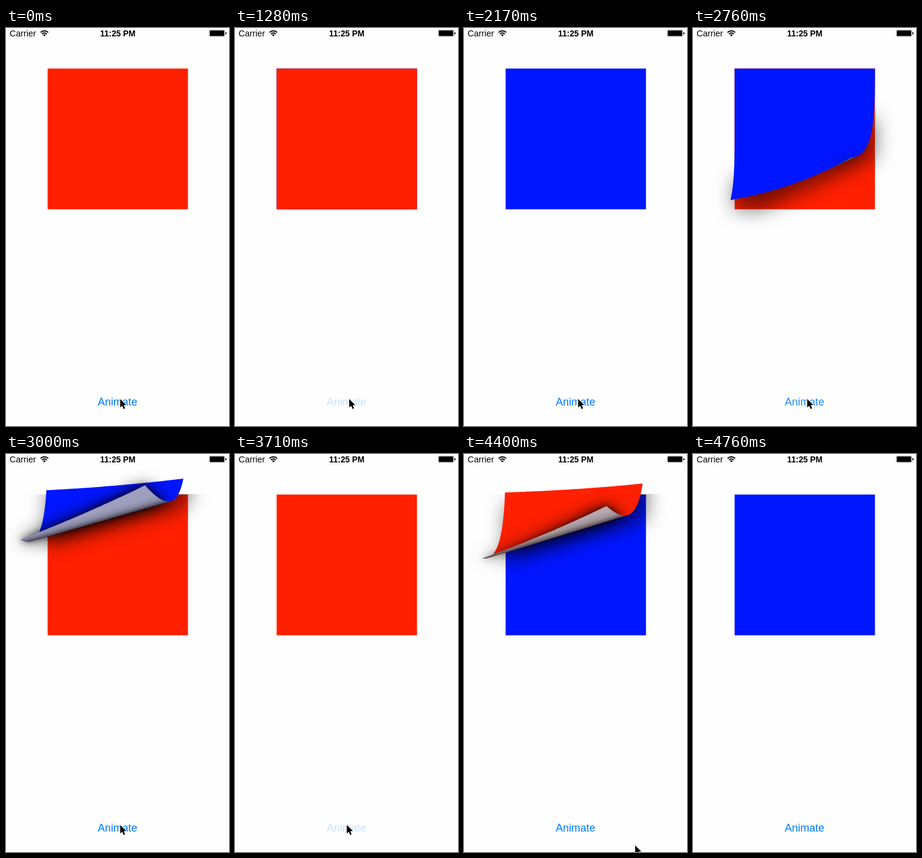
Write an HTML page with a canvas that moves like this. It is 372 px wide and 662 px high and loops after 5.31 s.

```html
<!DOCTYPE html>
<html lang="en">
<head>
<meta charset="utf-8">
<title>Page curl</title>
<style>
  html, body { margin: 0; width: 372px; height: 662px; overflow: hidden; background: #fefefe; }
  canvas, svg { position: absolute; left: 0; top: 0; }
  text { font-family: "Liberation Sans", Arial, sans-serif; }
</style>
</head>
<body>
<canvas id="stage" width="372" height="662"></canvas>
<svg width="372" height="662" viewBox="0 0 372 662">
  <text x="6" y="14" font-size="14.4">Carrier</text>
  <g fill="none" stroke="#000" stroke-width="2">
    <path d="M57.6 7.4a9 9 0 0 1 12.8 0M60 10a5.6 5.6 0 0 1 8 0"/>
    <path d="M61.8 11.6a3.2 3.2 0 0 1 4.4 0L64 14Z" fill="#000" stroke="none"/>
  </g>
  <text x="186.5" y="13.6" font-size="13.8" font-weight="700" text-anchor="middle">11:25 PM</text>
  <rect x="339" y="3.5" width="26" height="10.5" rx="1.8" fill="none" stroke="#777" stroke-width=".7"/>
  <rect x="340" y="4.3" width="24" height="8.9" rx="1"/>
  <path d="M366 6.8q2 .4 2 2t-2 2Z"/>
  <text id="button" x="186" y="628" font-size="18" fill="#007aff" text-anchor="middle">Animate</text>
  <path id="cursor" d="M0 0V14.2L3.3 11.2L5.6 16.7L8.1 15.6L5.8 10.2H10.2Z" stroke="#fff" stroke-width="1.8" paint-order="stroke"/>
</svg>
<script>
const LOOP = 5310;
const RED = { front: '#ff2000', back: [183, 168, 174] };
const BLUE = { front: '#0016ff', back: [158, 158, 190] };
const PAGE = { x: 69.45, y: 67.45, size: 234.1 };

// The picture only advances at these moments.
const ticks = [0, 840, 1280, 1400, 1520, 1630, 1750, 1870,
  2170, 2290, 2400, 2520, 2640, 2760, 2880, 3000, 3120, 3240,
  3480, 3600, 3710, 3830, 3940, 4060, 4180, 4290, 4400, 4520, 4640, 4760];

const turns = [
  { press: 840, start: 1278, top: RED, under: BLUE },
  { press: 2290, start: 2492, top: BLUE, under: RED },
  { press: 3480, start: 3920, top: RED, under: BLUE }
];
const CURL_TIME = 760;
const FADE_TIME = 320;

const ctx = document.getElementById('stage').getContext('2d');
const button = document.getElementById('button');
const cursor = document.getElementById('cursor');
const clamp = v => Math.max(0, Math.min(1, v));
const rgb = (color, k) => `rgb(${color.map(c => Math.round(c * k))})`;

function fillSquare(color) {
  ctx.fillStyle = color;
  ctx.fillRect(PAGE.x, PAGE.y, PAGE.size, PAGE.size);
}

// Paper rolled on a cylinder; v runs across its axis, u along it.
function curlShape(age) {
  const angle = (17.3 + 17 * (1 - age / 472)) * Math.PI / 180;
  const sin = Math.sin(angle), cos = Math.cos(angle), size = PAGE.size;
  const radius = 40 + 142 * Math.min(1, age / 472);
  const end = size * (sin + cos);
  const axis = end - 0.796 * age;
  const fold = Math.min(end, axis + radius * Math.PI / 2);
  const roll = v => v < axis ? v : axis + radius * Math.sin((v - axis) / radius);
  const column = v => [
    Math.max(-v * sin / cos, (v * cos - size) / sin),
    (size - v * sin) / cos
  ];
  const span = v => {
    const [lo, hi] = column(v);
    return [lo, Math.min(hi, v * cos / sin)];
  };
  return { angle, radius, axis, fold, end, roll, span, column };
}

function outline(span, from, to, place) {
  const left = [], right = [];
  const steps = Math.max(1, Math.ceil(to - from));
  for (let i = 0; i <= steps; i++) {
    const v = from + (to - from) * i / steps;
    const [lo, hi] = span(v);
    left.push([lo, place(v)]);
    right.unshift([hi, place(v)]);
  }
  const path = new Path2D();
  left.concat(right).forEach(([u, v]) => path.lineTo(u, v));
  path.closePath();
  return path;
}

function fillPath(path, style, blur = 0, alpha = 1) {
  ctx.save();
  if (blur) ctx.filter = `blur(${blur}px)`;
  ctx.globalAlpha = alpha;
  ctx.fillStyle = style;
  ctx.fill(path);
  ctx.restore();
}

function drawCurl(turn, age) {
  const shape = curlShape(age);
  const { axis, radius, fold, end, roll, span, column } = shape;
  const edge = roll(fold);
  const usePageAxes = () => {
    ctx.translate(PAGE.x, PAGE.y);
    ctx.rotate(-shape.angle);
  };

  fillSquare(turn.under.front);

  // Soft shadow of the lifted paper, never above the top of the page.
  const shadowFrom = axis + radius * 0.6, shadowTo = Math.min(end, edge + 14);
  if (shadowTo > shadowFrom) {
    ctx.save();
    ctx.beginPath();
    ctx.rect(0, PAGE.y - 1, 372, 600);
    ctx.clip();
    usePageAxes();
    fillPath(outline(column, shadowFrom, shadowTo, v => v), '#000', 16, 0.55);
    ctx.restore();
  }

  ctx.save();
  usePageAxes();
  if (fold > 0) fillPath(outline(span, 0, fold, roll), turn.top.front);
  if (end > fold) {
    const flap = outline(span, Math.max(0, fold), end, roll);
    const shade = ctx.createLinearGradient(0, edge, 0, edge - 32);
    [[0, 0.42], [0.1, 0.65], [0.25, 0.88], [0.5, 1], [1, 1]]
      .forEach(([at, k]) => shade.addColorStop(at, rgb(turn.top.back, k)));
    fillPath(flap, '#000', 14, 0.9);
    fillPath(flap, '#000', 6, 0.7);
    fillPath(flap, shade);
  }
  ctx.restore();
}

function drawPage(t) {
  ctx.clearRect(0, 0, 372, 662);
  const turn = turns.filter(k => t >= k.start).pop();
  if (!turn) fillSquare(RED.front);
  else if (t - turn.start < CURL_TIME) drawCurl(turn, t - turn.start);
  else fillSquare(turn.under.front);
}

function drawButton(t) {
  const turn = turns.filter(k => t >= k.press).pop();
  const level = turn ? 0.2 + 0.8 * clamp((t - turn.start) / FADE_TIME) : 1;
  button.setAttribute('opacity', level);
}

function drawCursor(t) {
  const leave = clamp((t - 4000) / 400) ** 2;
  const x = 190.5 - 4 * clamp((t - 3480) / 230) + 99 * leave;
  const y = 617 + 34 * leave;
  cursor.setAttribute('transform', `translate(${x} ${y})`);
  cursor.setAttribute('visibility', t < 4520 ? 'visible' : 'hidden');
}

let shown = -1;
function update(now) {
  const time = now % LOOP;
  const t = ticks.filter(k => k <= time).pop();
  if (t !== shown) {
    shown = t;
    drawPage(t);
    drawButton(t);
    drawCursor(t);
  }
}

const origin = performance.now();
function loop() {
  update(performance.now() - origin);
  requestAnimationFrame(loop);
}
loop();
</script>
</body>
</html>
```
